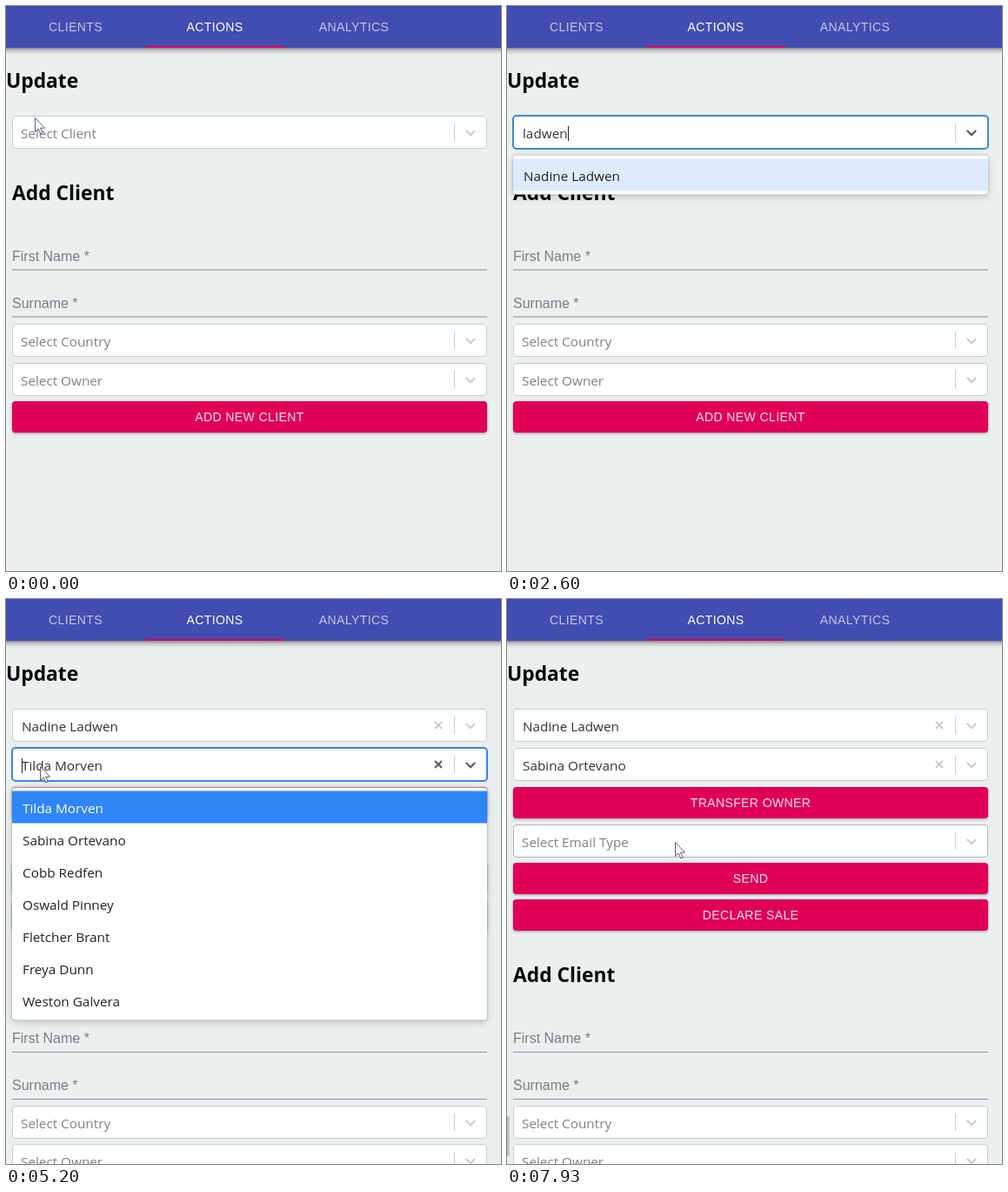
Write an HTML page that moves like this. It is 569 px wide and 649 px high and loops after 8000 ms.

```html
<!DOCTYPE html>
<html lang="en">
<head>
<meta charset="utf-8">
<title>Client actions</title>
<style>
  html, body { margin: 0; width: 100%; height: 100%; overflow: hidden; background: #eaeff0; }
  svg { display: block; width: 100%; height: 100%; }
  text { white-space: pre; }
  .ui { font: 15.3px "Open Sans", "Noto Sans", sans-serif; }
  .head { font: 700 22.8px "Open Sans", "Noto Sans", sans-serif; fill: #080408; }
  .label { font: 16px "Liberation Sans", Arial, sans-serif; fill: #7b7e80; }
  .caps { font: 14px "Liberation Sans", Arial, sans-serif; letter-spacing: .4px; text-anchor: middle; }
  .raised { filter: drop-shadow(0 1.5px 1.5px rgba(0,0,0,.36)); }
  .menu { filter: drop-shadow(0 0 .8px rgba(0,0,0,.3)) drop-shadow(0 3px 4px rgba(0,0,0,.16)); }
</style>
</head>
<body>
<svg id="stage" viewBox="0 0 569 649" xmlns="http://www.w3.org/2000/svg">
  <defs>
    <linearGradient id="barShade" x2="0" y2="1">
      <stop offset="0" stop-opacity=".42"/>
      <stop offset=".4" stop-opacity=".16"/>
      <stop offset="1" stop-opacity="0"/>
    </linearGradient>
    <linearGradient id="edgeShade">
      <stop offset="0" stop-opacity=".3"/>
      <stop offset="1" stop-opacity="0"/>
    </linearGradient>
  </defs>
  <g id="view"></g>
</svg>
<script>
const LOOP = 8000, STEP = 130, BLINK = 520;
const PINK = '#e00055', PINK_HOVER = '#c1005a';

const clients = [
  'Orson Pike', 'Lavinia Thornquist', 'Greta Holm', 'Corwin Slade', 'Percy Wicks',
  'Norris Palavendo', 'Dora Quill', 'Desmond Lathby', 'Trent Ladbury', 'Violet Mossland',
  'Hollander Wexbury', 'Lamont Tibbet', 'Nadine Ladwen'
];
const owners = [
  'Tilda Morven', 'Sabina Ortevano', 'Cobb Redfen', 'Oswald Pinney',
  'Fletcher Brant', 'Freya Dunn', 'Weston Galvera'
];
const client = 'Nadine Ladwen';
const query = 'ladwen';

// Key times of the interaction
const OPEN_CLIENT = 650, HIDE_MOUSE = 1820, SHOW_MOUSE = 2990, PICK_CLIENT = 3900;
const OPEN_OWNER = 5070, HOVER_OWNER = 6240, PICK_OWNER = 6500;
const PRESS = 7280, TOAST = 7930;
const keyTimes = [1560, 1690, 1820, 1950, 2470, 2600];
const LAST_KEY = keyTimes[keyTimes.length - 1];

// time, x, y
const mousePath = [
  [0, 33, 128], [260, 32, 136], [2990, 32, 136], [3120, 33, 146], [3510, 33, 146],
  [3900, 37, 190], [4550, 37, 190], [4940, 39, 192], [5460, 39, 192], [6110, 153, 259],
  [6370, 152, 273], [6500, 150, 273], [7020, 110, 239], [7280, 110, 239], [7930, 193, 279]
];

const view = document.getElementById('view');
const pen = document.createElement('canvas').getContext('2d');

function rect(x, y, w, h, fill, more = '') {
  return `<rect x="${x}" y="${y}" width="${w}" height="${h}" fill="${fill}" ${more}/>`;
}

function text(x, y, str, cls, fill) {
  return `<text x="${x}" y="${y}" class="${cls}"${fill ? ` fill="${fill}"` : ''}>${str}</text>`;
}

function stroke(d, color, width) {
  return `<path d="${d}" fill="none" stroke="${color}" stroke-width="${width}"/>`;
}

function textWidth(str) {
  pen.font = '15.3px "Open Sans", "Noto Sans", sans-serif';
  return pen.measureText(str).width;
}

function header() {
  const tabs = ['CLIENTS', 'ACTIONS', 'ANALYTICS'].map((name, i) =>
    text(80 + 160 * i, 29, name, 'caps', i === 1 ? '#fff' : '#c3c7e5')).join('');
  return rect(0, 48, 569, 8, 'url(#barShade)') + rect(0, 0, 569, 48, '#414db0') +
    tabs + rect(160, 46, 160, 2, '#e2005a');
}

function button(y, name, fill = PINK) {
  return rect(7, y, 546, 36, fill, 'rx="4" class="raised"') +
    text(280, y + 23, name, 'caps', '#fbe6ee');
}

function field(y, name) {
  return text(7, y, name, 'label');
}

function select(y, { hint = '', value = '', typed = '', focus, hover, caret }) {
  const ink = focus ? '#5d5a62' : '#ccc';
  const frame = focus
    ? rect(7, y, 546, 38, '#fff', `rx="4" stroke="${focus}" stroke-width="2"`)
    : rect(7.5, y + .5, 545, 37, '#fff', `rx="3.5" stroke="${hover ? '#b3b3b3' : '#ccc'}"`);
  let out = frame + rect(515, y + 9, 1, 20, '#ccc') +
    stroke(`M528.8 ${y + 17}L534 ${y + 22.2}L539.2 ${y + 17}`, ink, 2.2);
  if (value) {
    out += text(18, y + 26, value, 'ui', '#333') +
      stroke(`M493 ${y + 15}l8 8m0 -8l-8 8`, ink, 2);
  } else {
    out += typed ? text(18, y + 26, typed, 'ui', '#333') : text(17, y + 26, hint, 'ui', '#808080');
  }
  if (caret) out += rect(18 + Math.round(textWidth(typed)), y + 12, 1, 17, '#222');
  return out;
}

function scrollbar(y, thumb) {
  return rect(536, y, 17, 300, '#f1f1f1') + rect(538, y + 17, 13, thumb, '#c1c1c1') +
    `<path d="M541 ${y + 11}h8l-4 -4z" fill="#a3a3a3"/>` +
    `<path d="M541 ${y + 289}h8l-4 4z" fill="#505050"/>`;
}

function menu(y, items, active, chosen, thumb) {
  const full = items.length * 37 + 8;
  const scrolls = full > 300;
  let out = rect(7, y, 546, Math.min(full, 300), '#fff', 'rx="4" class="menu"');
  items.slice(0, 8).forEach((name, i) => {
    const top = y + 4 + 37 * i;
    const fill = i === chosen ? '#2f86f7' : i === active ? '#deebff' : '';
    if (fill) out += rect(7, top, scrolls ? 529 : 546, 37, fill);
    out += text(19, top + 25.5, name, 'ui', i === chosen ? '#fff' : '#222');
  });
  return out + (scrolls ? scrollbar(y, thumb) : '');
}

function addForm(dy) {
  // The short page sits on a half pixel, which softens the underlines
  const line = y => rect(7, dy ? y + dy + .5 : y, 546, 1, dy ? '#91969a' : '#858a8c');
  return text(7, 223 + dy, 'Add Client', 'head') +
    field(293 + dy, 'First Name *') + line(302.5) +
    field(347 + dy, 'Surname *') + line(356.5) +
    select(365 + dy, { hint: 'Select Country' }) +
    select((dy ? 409 : 410) + dy, { hint: 'Select Owner' }) +
    button(454 + dy, 'ADD NEW CLIENT');
}

function mouseAt(t) {
  const i = Math.max(1, mousePath.findIndex(p => p[0] >= t));
  const [t0, x0, y0] = mousePath[i - 1], [t1, x1, y1] = mousePath[i];
  const k = (t - t0) / (t1 - t0);
  return [Math.round(x0 + (x1 - x0) * k), Math.round(y0 + (y1 - y0) * k)];
}

function pointer(x, y, hand) {
  const d = hand
    ? 'M-1 1.5Q0 -.5 1.5 1.5V7Q3 5.8 4.2 7.4Q5.6 6.4 6.6 8Q8.6 7.6 8.8 9.6V14Q8.4 16.5 7 18V20H-.5V18L-4 13Q-5 10.5 -2.8 10.8L-1 12.4Z'
    : 'M0 0V16L3.7 12.6L6.2 18.4L8.6 17.4L6.1 11.7H11Z';
  return `<path transform="translate(${x + .5} ${y + .5})" d="${d}" fill="#fff" stroke="#575c70" stroke-linejoin="round"/>` +
    (hand ? stroke(`M${x + 2} ${y + 7.5}v4m2.8 -3.6v3.6m2.5 -3v3`, '#777b88', .8) : '');
}

function blink(t, since) {
  return Math.floor((t - since) / BLINK) % 2 === 0;
}

function clientPage(t) {
  const open = t >= OPEN_CLIENT;
  const pressed = keyTimes.filter(k => k <= t);
  const typed = query.slice(0, pressed.length);
  const since = pressed.length ? pressed[pressed.length - 1] : OPEN_CLIENT;
  let out = addForm(0) + select(126, {
    hint: 'Select Client', typed, focus: open && '#4189d4',
    caret: open && blink(t, since)
  });
  if (open) {
    const hits = clients.filter(n => n.toLowerCase().includes(typed));
    out += menu(171.5, hits, 0, -1, typed ? 26 : 17);
  }
  return out;
}

function ownerPage(t, overButton) {
  const clientFocus = t < OPEN_OWNER;
  const ownerFocus = !clientFocus && t < PRESS;
  const picked = t >= PICK_OWNER;
  // Picking an option leaves the caret's rhythm untouched
  let out = select(126, {
    value: client, focus: clientFocus && '#4189d4',
    caret: clientFocus && blink(t, LAST_KEY)
  });
  out += select(171, {
    value: owners[picked ? 1 : 0], focus: ownerFocus && '#3884f0',
    caret: ownerFocus && blink(t, OPEN_OWNER)
  });
  out += button(216, 'TRANSFER OWNER', overButton ? PINK_HOVER : PINK) +
    select(259, { hint: 'Select Email Type', hover: t > PRESS && !overButton }) +
    button(303, 'SEND') + button(345, 'DECLARE SALE') + addForm(217);
  if (ownerFocus && !picked) {
    out += menu(216.5, owners, t >= HOVER_OWNER ? 1 : -1, 0);
  }
  if (t >= TOAST) out += rect(0, 594, 4, 46, 'url(#edgeShade)', 'rx="2"');
  return out;
}

function draw(t) {
  const [x, y] = mouseAt(t);
  const overButton = t >= PICK_OWNER && y >= 216 && y < 252;
  const mouse = t < HIDE_MOUSE || t >= SHOW_MOUSE;
  view.innerHTML = rect(0, 0, 569, 649, '#eaeff0') + header() +
    text(0, 94, 'Update', 'head') +
    (t < PICK_CLIENT ? clientPage(t) : ownerPage(t, overButton)) +
    (mouse ? pointer(x, y, overButton) : '');
}

const start = performance.now();
let shown = -1;
function tick() {
  const t = Math.floor(((performance.now() - start) % LOOP) / STEP) * STEP;
  if (t !== shown) draw(shown = t);
  requestAnimationFrame(tick);
}
tick();
</script>
</body>
</html>
```
